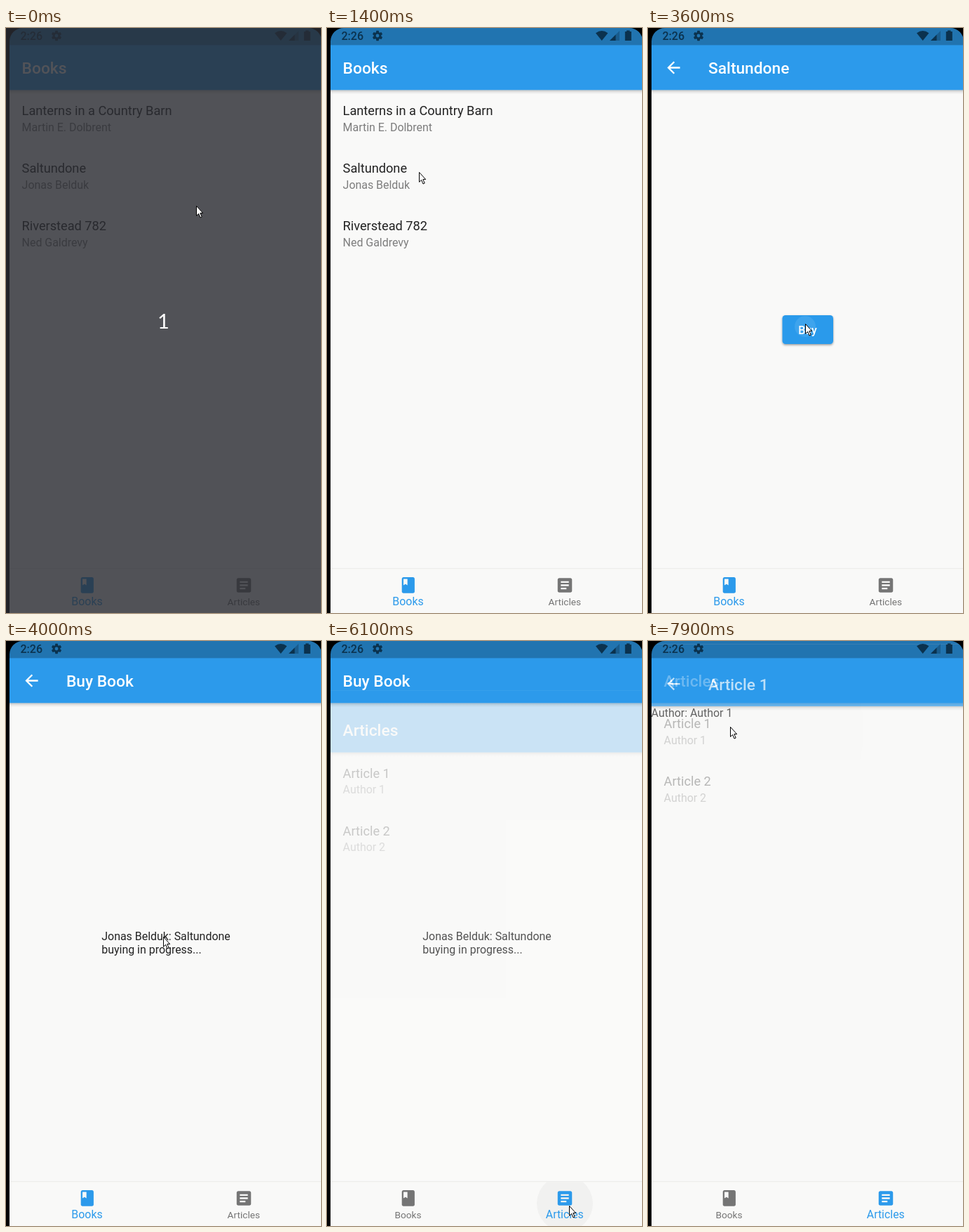
An HTML page for the animation above (8000 ms loop, 449x833 px).

```html
<!DOCTYPE html>
<html lang="en">
<head>
<meta charset="utf-8">
<title>Book shop app</title>
<style>
  html, body { margin: 0; width: 100%; height: 100%; overflow: hidden; background: #000; }
  svg { display: block; width: 449px; height: 833px; font-family: Roboto, sans-serif; }
  .bar { font-size: 22.75px; font-weight: 500; fill: #fff; }
  .head { font-size: 18.2px; fill: #222; }
  .sub { font-size: 15.93px; fill: #7d7d7d; }
  .body { font-size: 15.93px; fill: #222; }
  .mid { text-anchor: middle; }
</style>
</head>
<body>
<svg id="stage" viewBox="0 0 449 833" xmlns="http://www.w3.org/2000/svg"></svg>
<script>
const BLUE = '#2c9aeb', GREY = '#757575', PAPER = '#f9f9f8', INK = '#0b324e';
const LOOP = 8000, STEP = 100;
const DP = 1.1375, ROW = 72 * DP, BAR = 88.3, INSET = 22.6, RISE = 192;
const TITLE = 'Saltundone', AUTHOR = 'Jonas Belduk';

const ICONS = {
  back: 'M20 11H7.83l5.59-5.59L12 4l-8 8 8 8 1.41-1.41L7.83 13H20z',
  book: 'M18 2H6c-1.1 0-2 .9-2 2v16c0 1.1.9 2 2 2h12c1.1 0 2-.9 2-2V4c0-1.1-.9-2-2-2zM6 4h5v8l-2.5-1.5L6 12z',
  article: 'M19 3H5c-1.1 0-2 .9-2 2v14c0 1.1.9 2 2 2h14c1.1 0 2-.9 2-2V5c0-1.1-.9-2-2-2zm-5 14H7v-2h7zm3-4H7v-2h10zm0-4H7V7h10z'
};

const text = (x, y, cls, str, extra = '') => `<text x="${x}" y="${y}" class="${cls}" ${extra}>${str}</text>`;

const icon = (name, cx, cy, fill, id = '') =>
  `<path id="${id}" d="${ICONS[name]}" fill="${fill}" fill-rule="evenodd"
    transform="translate(${cx} ${cy}) scale(${DP}) translate(-12 -12)"/>`;

const tile = ([head, sub], i) =>
  text(INSET, 124.4 + i * ROW, 'head', head) + text(INSET, 147 + i * ROW, 'sub', sub);

const ripple = (id, fill) => `<g clip-path="url(#${id}Area)"><circle id="${id}" fill="${fill}"/></g>`;

const area = (id, shape) => `<clipPath id="${id}Area">${shape}</clipPath>`;

const row = i => `<rect x="4" y="${BAR + i * ROW}" width="446" height="${ROW}"/>`;

const page = (id, title, content, back) => `
  <g id="${id}">
    <rect x="4" width="448" height="833" fill="${PAPER}"/>
    <rect x="4" y="${BAR}" width="448" height="6" fill="url(#shade)"/>
    <rect x="4" width="448" height="${BAR}" fill="${BLUE}"/>
    ${back ? icon('back', 36.5, 56.5, '#fff', id + 'Back') : ''}
    ${text(back ? 86 : INSET, 65, 'bar', title, `id="${id}Title"`)}
    ${content}
  </g>`;

const pages = [
  page('books', 'Books', ripple('bookTap', '#00000006') + [
    ['Lanterns in a Country Barn', 'Martin E. Dolbrent'],
    [TITLE, AUTHOR],
    ['Riverstead 782', 'Ned Galdrevy']
  ].map(tile).join('')),
  page('detail', TITLE, `
    <rect x="191.5" y="409" width="72.5" height="41" rx="4.5" fill="${BLUE}" filter="url(#lift)"/>
    ${text(227.5, 435.5, 'mid', 'Buy', 'fill="#fff" font-size="15.93" font-weight="500"')}
    ${ripple('buyTap', '#ffffff18')}`, true),
  page('buy', 'Buy Book',
    text(136.3, 426.4, 'body', `${AUTHOR}: ${TITLE}`) +
    text(136.3, 444.6, 'body', 'buying in progress...'), true),
  page('articles', 'Articles', ripple('articleTap', '#00000006') +
    [['Article 1', 'Author 1'], ['Article 2', 'Author 2']].map(tile).join('')),
  page('article', 'Article 1', text(4.6, 103, 'body', 'Author: Author 1'), true)
].join('');

const gear = Array.from({ length: 6 }, (_, i) =>
  `<rect x="-1.9" y="-7.2" width="3.8" height="4" rx=".6" transform="rotate(${i * 60})"/>`).join('');

const statusBar = `
  <rect width="449" height="24.400" fill="#000" opacity=".25"/>
  <g fill="${INK}">
    ${text(20.5, 17, '', '2:26', 'font-size="16" font-weight="500"')}
    <g transform="translate(72 11)">${gear}<circle r="3.9" fill="none" stroke="${INK}" stroke-width="3"/></g>
    <path d="M383 7.2Q391.7 .6 400.4 7.2L391.7 18Z"/>
    <path d="M403 18L417 4V18Z" opacity=".35"/>
    <path d="M403 18L411.5 9.5V18Z"/>
    <path d="M427 5V3.5h4.500V5h2.300V18h-9V5Z"/>
  </g>`;

const navBar = `
  <rect x="4" y="769" width="446" height="1.5" fill="#ededec"/>
  <rect x="4" y="770.5" width="446" height="63" fill="${PAPER}"/>
  ${ripple('navTap', '#00000008')}
  ${icon('book', 115.8, 793.5, BLUE, 'booksIcon')}
  ${icon('article', 339, 793.5, GREY, 'articlesIcon')}
  ${text(115.5, 822.3, 'mid', 'Books', 'id="booksLabel"')}
  ${text(338.8, 822.3, 'mid', 'Articles', 'id="articlesLabel"')}`;

document.getElementById('stage').innerHTML = `
  <defs>
    <linearGradient id="shade" x2="0" y2="1">
      <stop offset="0" stop-color="#000" stop-opacity=".24"/>
      <stop offset=".4" stop-color="#000" stop-opacity=".09"/>
      <stop offset="1" stop-color="#000" stop-opacity="0"/>
    </linearGradient>
    <filter id="lift" x="-20%" y="-20%" width="140%" height="150%">
      <feDropShadow dx="0" dy="1.5" stdDeviation="1.5" flood-opacity=".38"/>
    </filter>
    ${area('bookTap', row(1))}
    ${area('articleTap', row(0))}
    ${area('buyTap', '<rect x="191.5" y="409" width="72.5" height="41" rx="4.5"/>')}
    ${area('navTap', '<path d="M313 770.5H365A40 40 0 1 1 313 770.5Z"/>')}
  </defs>
  ${pages}${statusBar}${navBar}
  <path d="M0 0H24A19 19 0 0 0 5 19V833H0Z"/>
  <path d="M431 0A19 19 0 0 1 450 19V0Z"/>
  <g id="countdown">
    <rect width="449" height="833" fill="#2a2c32" opacity=".81"/>
    ${text(224.5, 427.5, 'mid', '1', 'fill="#fff" font-size="29" style="font-family:Lato,sans-serif"')}
  </g>
  <path id="cursor" d="M.5 .5V14.300L3.600 11.400L6 17L8.200 16L5.800 10.600H9.700Z" fill="#fff" stroke="#000" stroke-linejoin="round"/>`;

const $ = id => document.getElementById(id);
const set = (id, attrs) => Object.entries(attrs).forEach(([k, v]) => $(id).setAttribute(k, v));
const clamp = v => Math.max(0, Math.min(1, v));

// pointer glides: from, until, end point, sideways bow
const GLIDES = [
  { from: 700, until: 900, to: [244, 267], bow: 15 },
  { from: 1000, until: 1400, to: [131, 205], bow: -40 },
  { from: 2700, until: 3200, to: [219, 417], bow: 78 },
  { from: 3300, until: 3400, to: [224, 421], bow: 0 },
  { from: 4100, until: 4200, to: [220, 425], bow: 0 },
  { from: 4400, until: 4700, to: [246, 546], bow: 0 },
  { from: 4800, until: 5200, to: [325, 774], bow: 0 },
  { from: 5300, until: 5700, to: [345, 804], bow: 28 },
  { from: 6600, until: 6700, to: [277, 576], bow: 0 },
  { from: 6800, until: 7100, to: [117, 122], bow: 0 }
];

// progress already made when a page first shows
const OPENINGS = [
  { id: 'detail', start: 1900, head: .29 },
  { id: 'buy', start: 3700, head: .29 },
  { id: 'articles', start: 6100, head: .41 },
  { id: 'article', start: 7800, head: .49 }
];

const TAPS = [
  { id: 'bookTap', start: 1800, spread: 190 },
  { id: 'buyTap', start: 3600, spread: 60 },
  { id: 'navTap', start: 6100, spread: 200 },
  { id: 'articleTap', start: 7700, spread: 190 }
];

function bezier(x1, y1, x2, y2) {
  const at = (a, b, u) => 3 * a * u * (1 - u) ** 2 + 3 * b * u * u * (1 - u) + u ** 3;
  return x => {
    let lo = 0, hi = 1;
    for (let i = 0; i < 24; i++) {
      const u = (lo + hi) / 2;
      if (at(x1, x2, u) < x) lo = u; else hi = u;
    }
    return at(y1, y2, lo);
  };
}
const fadeIn = bezier(.42, 0, 1, 1);
const slideIn = bezier(.4, 0, .2, 1);
const smooth = p => p * p * (3 - 2 * p);

function pointer(t) {
  let [x, y] = [271, 253];
  for (const { from, until, to, bow } of GLIDES) {
    if (t <= from) break;
    const p = smooth(clamp((t - from) / (until - from)));
    const dx = to[0] - x, dy = to[1] - y;
    const side = bow * Math.sin(Math.PI * p) / Math.hypot(dx, dy);
    x += dx * p + dy * side;
    y += dy * p - dx * side;
  }
  return [Math.round(x), Math.round(y)];
}

function selectTab(name, on) {
  set(name + 'Icon', { fill: on ? BLUE : GREY });
  set(name + 'Label', { fill: on ? BLUE : GREY, 'font-size': (on ? 14 : 12) * DP });
}

function draw(time) {
  const t = Math.floor(time / STEP) * STEP;
  const [x, y] = pointer(t);
  set('cursor', { transform: `translate(${x} ${y})` });

  for (const { id, start, head } of OPENINGS) {
    const p = t < start ? 0 : clamp(head + (t - start) / 320);
    set(id, {
      opacity: p < 1 ? fadeIn(p) : 1,
      transform: `translate(0 ${p < 1 ? RISE * (1 - slideIn(p)) : 0})`,
      visibility: p ? 'visible' : 'hidden'
    });
  }

  for (const { id, start, spread } of TAPS) {
    const p = clamp((t - start) / 400);
    set(id, { cx: x, cy: y + 4, r: spread * (.25 + 1.5 * p), opacity: t < start ? 0 : 1 - p });
  }

  const onArticles = t >= 6100;
  selectTab('books', !onArticles);
  selectTab('articles', onArticles);
  set('buyBack', { opacity: onArticles ? 0 : 1 });
  set('buyTitle', { x: onArticles ? INSET : 86 });
  set('countdown', { visibility: t < 100 ? 'visible' : 'hidden' });
}

const origin = performance.now();
function tick() {
  draw((performance.now() - origin) % LOOP);
  requestAnimationFrame(tick);
}
tick();
</script>
</body>
</html>
```
